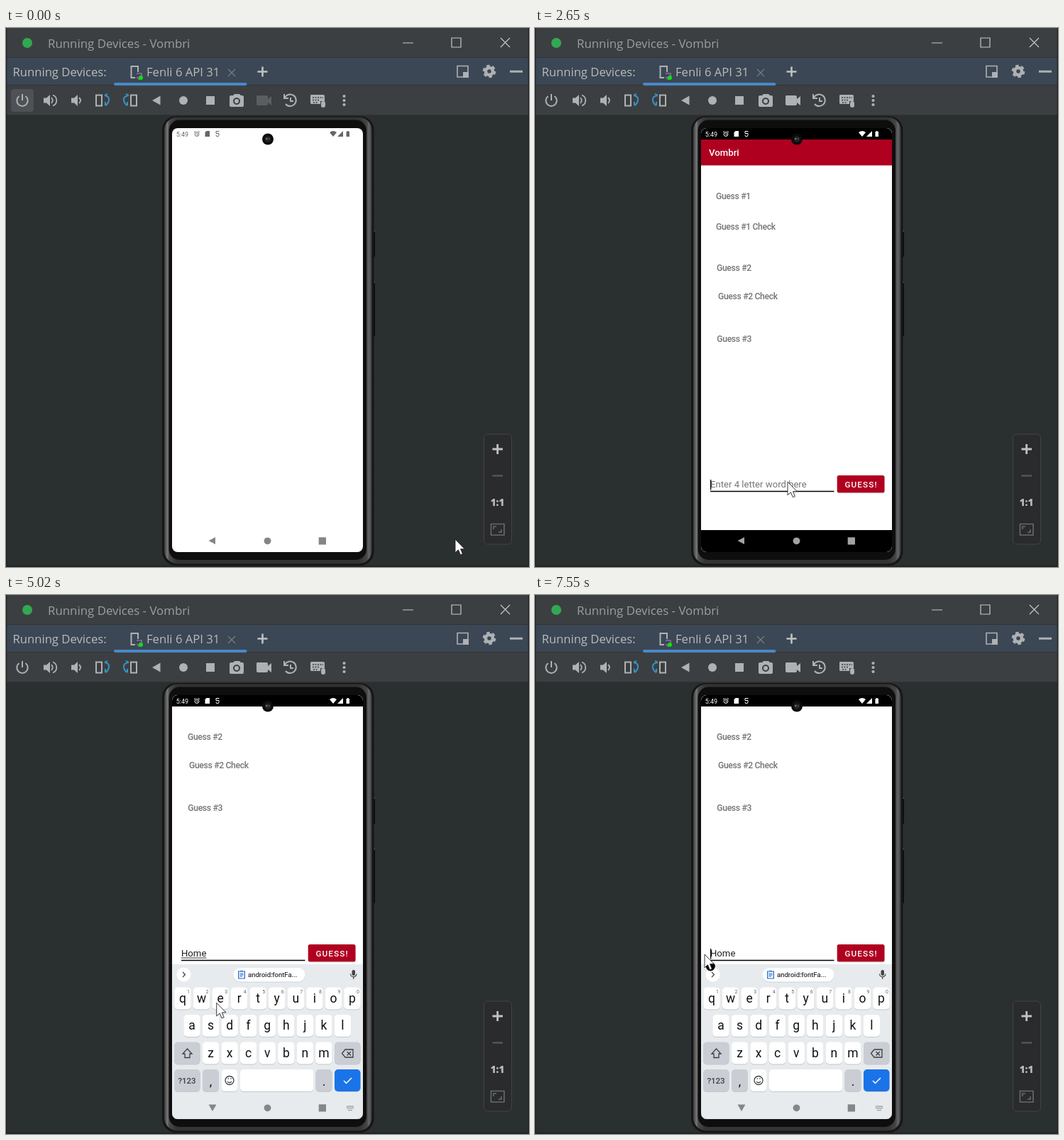
An HTML page that plays this animation: 737 by 759 pixels, repeating every 8000 ms.

```html
<!DOCTYPE html>
<html lang="en">
<head>
<meta charset="utf-8">
<title>Running Devices</title>
<style>
html, body { margin: 0; width: 100%; height: 100%; overflow: hidden; background: #2a2f30; }
svg { display: block; width: 100%; height: 100%; }
text { white-space: pre; font-family: Roboto, sans-serif; }
.ide { font-family: "Open Sans", sans-serif; font-size: 16.65px; fill: #bbb; }
.icon { fill: #afb1b3; }
.line { fill: none; stroke: #afb1b3; stroke-width: 2; }
.blue { stroke: #3592c4; }
.label { font-size: 12.2px; font-weight: 500; letter-spacing: -.35px; fill: #757575; }
.field { font-size: 13.15px; }
.button { font-size: 11.8px; font-weight: 500; letter-spacing: 1.05px; fill: #fff; }
.key { font-size: 17.5px; text-anchor: middle; fill: #111; }
.digit { font-size: 7px; text-anchor: middle; fill: #5f6368; }
</style>
</head>
<body>
<svg viewBox="0 0 737 759" preserveAspectRatio="none">
  <defs>
    <linearGradient id="metal" gradientUnits="userSpaceOnUse" x1="223" x2="515.500">
      <stop offset="0" stop-color="#3a3a3a"/><stop offset=".016" stop-color="#777"/>
      <stop offset=".024" stop-color="#4a4a4a"/><stop offset=".06" stop-color="#333"/>
      <stop offset=".94" stop-color="#333"/><stop offset=".976" stop-color="#464646"/>
      <stop offset=".986" stop-color="#666"/><stop offset="1" stop-color="#3a3a3a"/>
    </linearGradient>
    <clipPath id="screen"><rect x="234" y="141" width="269" height="597" rx="8"/></clipPath>
    <clipPath id="below-status"><rect x="234" y="157" width="269" height="581"/></clipPath>
  </defs>

  <!-- window chrome -->
  <rect width="737" height="759" fill="#2a2f30"/>
  <rect width="737" height="123" fill="#3c3f41"/>
  <rect y="42" width="737" height="38" fill="#3b4754"/>
  <path d="M0 41.5H737M0 80.5H737M0 122.5H737" stroke="#313335"/>
  <path d="M.5 0V759M736.5 0V759M0 757.8H737" stroke="#1f2122" stroke-width="1.4"/>
  <circle cx="30" cy="21" r="7" fill="#32a852"/>
  <text class="ide" x="59" y="27.5" style="font-size:16.85px;fill:#9c9fa0">Running Devices - Vombri</text>
  <path d="M559 21H574M628 14H641V27H628ZM697 14L710 27M710 14L697 27" fill="none" stroke="#c6c7c8" stroke-width="1.2"/>
  <text class="ide" x="9.5" y="68">Running Devices:</text>
  <text class="ide" x="198" y="68">Fenli 6 API 31</text>
  <rect x="152" y="77" width="187.500" height="4" rx="2" fill="#4a88c7"/>
  <path class="line" d="M182 70H176.500V54H186V62" stroke-width="2"/>
  <path d="M184 64H191V70H184M186 72H191" fill="none" stroke="#8e6aad" stroke-width="1.6"/>
  <circle cx="190" cy="70" r="3" fill="#0be30b"/>
  <path d="M313 58L323 68M323 58L313 68" stroke="#777d82" stroke-width="1.2"/>
  <path d="M354.500 61.500H368.500M361.500 54.500V68.500" stroke="#bfc1c3" stroke-width="2.600"/>
  <path class="line" d="M636 53.500H651V69H636Z" style="stroke-width:1.600"/>
  <path class="icon" d="M644 62H652V70H644ZM710 59.800H728V62.800H710Z"/>
  <circle class="line" cx="681" cy="61" r="5" style="stroke-width:4.500"/>
  <circle class="line" cx="681" cy="61" r="8" style="stroke-width:2.600" stroke-dasharray="4.600 3.778"/>

  <!-- device toolbar -->
  <rect id="power-focus" x="7" y="86" width="32" height="32" rx="4" fill="#4e5254"/>
  <path class="line" d="M23 93V102M18.500 96A7.700 7.700 0 1 0 27.500 96"/>
  <path class="icon" d="M53 98.500H57L62 94V110L57 105.500H53ZM92 98.500H96L101 94V110L96 105.500H92Z"/>
  <path class="line" d="M64 98Q67.500 102 64 106M66 94.500C73 97 73 107 66 109.500M103 98Q107 102 103 106" style="stroke-width:1.800"/>
  <path class="line" d="M127 94.500H135V109.500H127ZM176 94.500H184V109.500H176Z"/>
  <path class="line blue" d="M139 95Q146 96 145 102Q144 107 140 109M139 95L143 93M140 109L140 104M173 95Q165 96 166 102Q167 107 171 109M173 95L169 93M171 109L171 104"/>
  <path class="icon" d="M206 102L217.500 95.500V108.500ZM282 96H294V108H282Z"/>
  <circle class="icon" cx="250" cy="102" r="6"/>
  <path class="icon" fill-rule="evenodd" d="M317 95H320L322 93H329L331 95H333Q335 95 335 97V109Q335 111 333 111H317Q315 111 315 109V97Q315 95 317 95ZM325 98A5 5 0 1 0 325.010 98Z"/>
  <circle class="icon" cx="325" cy="103" r="3"/>
  <path id="video" d="M354 95H367Q369 95 369 97V100L374 96V109L369 105V107Q369 109 367 109H355Q353 109 353 107V97Q353 95 354 95Z"/>
  <path class="line" d="M393 98A8.300 8.300 0 1 1 394 107M392 93V99H398M401 98V103H405"/>
  <path class="icon" d="M430 94H447Q449 94 449 96V103H443V107H430Q429 107 429 105V96Q429 94 430 94Z"/>
  <path d="M432 98H447M432 101.500H442M433 105H440" stroke="#3c3f41" stroke-width="1.700" stroke-dasharray="2 1.500"/>
  <rect class="icon" x="444" y="103" width="6" height="9" rx="3"/>
  <g class="icon"><circle cx="476.500" cy="96" r="2.100"/><circle cx="476.500" cy="102" r="2.100"/><circle cx="476.500" cy="108" r="2.100"/></g>

  <!-- zoom panel -->
  <rect x="673.500" y="572" width="39" height="155" rx="5" fill="#292b2c" stroke="#424446"/>
  <path d="M685.500 593H700M692.700 586V600" stroke="#bfc1c3" stroke-width="2.800"/>
  <path d="M685.500 630.500H700" stroke="#595c5d" stroke-width="2.200"/>
  <text class="ide" x="692.500" y="673" text-anchor="middle" style="font-size:13.500px;font-weight:800">1:1</text>
  <path d="M683.500 698.500H702V714H683.500ZM687 706V702H691M698 706V710H694" fill="none" stroke="#686b6c" stroke-width="1.600"/>

  <!-- phone body -->
  <path d="M518.500 286V322M518.500 358V434" stroke="#0d0d0d" stroke-width="3"/>
  <path d="M518 286H520M518 358H520M220 208H222M220 680H222" stroke="#777"/>
  <rect x="220" y="124" width="298.500" height="633" rx="20" fill="#161616"/>
  <rect x="223" y="125.500" width="292.500" height="629" rx="18.500" fill="url(#metal)"/>
  <rect x="229.500" y="129.500" width="278.500" height="619.500" rx="15" fill="#0e0e0e"/>

  <g clip-path="url(#screen)">
    <rect x="234" y="141" width="269" height="597" fill="#fff"/>
    <g id="app">
      <rect x="234" y="141" width="269" height="597" fill="#fff"/>
      <g clip-path="url(#below-status)">
        <g id="content">
          <rect x="234" y="157" width="269" height="36.500" fill="#b00020"/>
          <text x="245" y="180.300" fill="#fff" font-size="13.200" font-weight="500">Vombri</text>
          <g class="label">
            <text x="255" y="241">Guess #1</text><text x="255" y="284">Guess #1 Check</text>
            <text x="256" y="342">Guess #2</text><text x="258" y="382">Guess #2 Check</text>
            <text x="256.300" y="442">Guess #3</text>
          </g>
          <path id="rule" d="M247 652.500H421.500"/>
          <text id="hint" class="field" x="247" y="647" fill="#757575">Enter 4 letter word here</text>
          <text id="word" class="field" x="247" y="647" fill="#202020"></text>
          <path id="compose" stroke="#202020" stroke-width=".9"/>
          <rect id="caret" y="636" width="1.300" height="14.500"/>
          <rect x="426" y="631" width="66.500" height="24.300" rx="3" fill="#000" opacity=".2"/>
          <rect x="425.700" y="630" width="66.800" height="24.300" rx="2.600" fill="#b00020"/>
          <rect id="ripple" x="425.700" y="630" width="66.800" height="24.300" rx="2.600" fill="#fff"/>
          <text class="button" x="436.500" y="646.600">GUESS!</text>
        </g>
      </g>
      <rect x="234" y="141" width="269" height="16" fill="#000"/>
      <rect x="234" y="707" width="269" height="31" fill="#000"/>
    </g>
    <g id="status">
      <text x="239.700" y="152.600" font-size="9">5:49</text>
      <circle cx="269" cy="149.500" r="2.900" fill="none" stroke="currentColor"/>
      <path d="M265 147L267 145M273 147L271 145M269 148V150H270.500" fill="none" stroke="currentColor" stroke-width=".9"/>
      <path d="M282.500 145H287V153H280.500V147Z"/>
      <path d="M300.500 145.500H296V148.500H300V150.500Q300 153 298 153Q296 153 296 150.500" fill="none" stroke="currentColor"/>
      <path d="M456 147Q461 143 466 147L461 153ZM467 153L475 145V153ZM479.500 146H480.700V145H482.700V146H484V153H479.500Z"/>
    </g>
    <g id="keyboard"></g>
    <g id="nav">
      <path id="back" d="M285.500 722L295 717V727Z"/>
      <circle cx="368.500" cy="722.300" r="4.900"/>
      <path d="M440.700 717.300H451V727.500H440.700Z"/>
    </g>
    <path id="handle" d="M247.300 516L252 518.500A6.500 6.500 0 1 1 242.600 518.500Z"/>
  </g>
  <circle cx="369" cy="156.500" r="8" fill="#0b0c0d"/>
  <circle cx="369" cy="156.500" r="4" fill="#22262a"/>
  <circle cx="367.300" cy="156" r="1.100" fill="#8a9299"/><circle cx="371" cy="156" r=".8" fill="#646b70"/>
  <path id="pointer" d="M0 0V18.800L4.400 14.800L7.400 21.800L10.400 20.500L7.600 13.700H13.300Z" fill="#fff" stroke="#222" stroke-width=".9"/>
</svg>

<script>
const LOOP = 8000, PAN = 138, CLICK = 7400;
const $ = id => document.getElementById(id);
const clamp = v => Math.max(0, Math.min(1, v));
const easeOut = v => 1 - (1 - clamp(v)) ** 3;

const bursts = [
  [1330, 1640, 5], [1780, 2580, 11], [2650, 2730, 2], [2920, 3260, 6],
  [4390, 5180, 11], [5250, 5410, 3], [5560, 5790, 4], [6040, 6740, 10], [6910, 7550, 9]
];
const ticks = bursts.flatMap(([a, b, n]) =>
  Array.from({ length: n }, (_, i) => a + (b - a) * i / (n - 1)));
const snap = t => ticks.reduce((last, tick) => tick <= t + 3 ? tick : last, 0);

const route = [
  [0, 633, 720], [1720, 633, 720], [2150, 500, 688], [2560, 356, 639],
  [4320, 356, 639], [4780, 277, 592], [5025, 297, 574], [5180, 457, 516],
  [5400, 448, 511], [6240, 448, 511], [6740, 322, 494], [6840, 322, 494],
  [7070, 290, 470], [7390, 239, 506], [LOOP, 239, 506]
];
function pointerAt(t) {
  const i = route.findIndex(p => p[0] > t);
  const [t0, x0, y0] = route[i - 1], [t1, x1, y1] = route[i];
  const k = (t - t0) / (t1 - t0);
  return [x0 + (x1 - x0) * k, y0 + (y1 - y0) * k];
}

const typed = [[3600, "H"], [3830, "Ho"], [4010, "Hom"], [4160, "Home"]];
const caretResets = [2650, ...typed.map(k => k[0]), CLICK];

function buildKeyboard() {
  const key = (x, y, w, fill = "#fff") =>
    `<rect x="${x}" y="${y + 1}" width="${w}" height="31" rx="5" fill="#c3c8cc"/>
     <rect x="${x}" y="${y}" width="${w}" height="31" rx="5" fill="${fill}"/>`;
  const grey = "#cacdd4", rows = [["QWERTYUIOP", 249, 552.5], ["ASDFGHJKL", 262, 591], ["ZXCVBNM", 288.6, 629.5]];
  let out = `<rect x="234" y="520" width="269" height="218" fill="#e7ebed"/>
    <circle cx="250.500" cy="534.500" r="10" fill="#fff"/>
    <path d="M249 531L252.500 534.500L249 538" fill="none" stroke="#444" stroke-width="1.300"/>
    <rect x="320.500" y="526" width="101" height="19.500" rx="9.700" fill="#d0d4d7"/>
    <rect x="320.500" y="525" width="101" height="19.500" rx="9.700" fill="#fff"/>
    <path d="M327.700 530H336.300V540H327.700ZM330 529.500H334M329.500 533H334.500M329.500 535H334.500M329.500 537H333" fill="none" stroke="#1a66c9" stroke-width="1.200"/>
    <text x="341" y="538" font-size="9.500" fill="#222" stroke="#222" stroke-width=".15">android:fontFa...</text>
    <rect x="487.500" y="528" width="4.500" height="8" rx="2.200" fill="#444"/>
    <path d="M485.500 533.500A4.200 4.200 0 0 0 494 533.500M489.750 538V541" fill="none" stroke="#444" stroke-width="1.200"/>`;
  rows.forEach(([letters, x0, y], row) => [...letters].forEach((c, i) => {
    const x = x0 + 26.55 * i;
    out += key(x - 11.7, y, 23.4) + `<text class="key letter" x="${x}" y="${y + 22}">${c}</text>`;
    if (!row) out += `<text class="digit" x="${x + 8}" y="560.500">${(i + 1) % 10}</text>`;
  }));
  out += key(237, 629.5, 36.5, grey) + key(463, 629.5, 36.5, grey) + key(237, 668, 36.5, grey) +
    key(277, 668, 23, grey) + key(303.5, 668, 23) + key(330, 668, 103.5) +
    key(436.5, 668, 23, grey) + key(463, 668, 36.5, "#1a73e8") +
    `<path id="shift" d="M255.500 639L262 646H259V651.500H252V646H249Z" stroke="#3c4043" stroke-width="1.300"/>
    <path d="M473.500 645.500L478 640H489V651H478ZM480.500 643L486 648.500M486 643L480.500 648.500" fill="none" stroke="#3c4043" stroke-width="1.300"/>
    <text class="key" x="255" y="688" style="font-size:11.500px;font-weight:500;fill:#3c4043">?123</text>
    <text class="key" x="288.500" y="691">,</text><text class="key" x="448" y="691">.</text>
    <circle cx="315" cy="683.500" r="6" fill="none" stroke="#3c4043" stroke-width="1.300"/>
    <path d="M312 685A3.500 3.500 0 0 0 318 685M312.500 681H313.800M316.300 681H317.600" fill="none" stroke="#3c4043" stroke-width="1.400"/>
    <path d="M476 684L479.500 687.500L487 680" fill="none" stroke="#fff" stroke-width="1.500"/>
    <path d="M480 720H490M480 722.500H490M482 725.500H488" stroke="#8a8e91" stroke-width="1.500" stroke-dasharray="1.500 .6"/>`;
  $("keyboard").innerHTML = out;
}
buildKeyboard();
const letters = [...document.querySelectorAll(".letter")];
const set = (id, attrs) => Object.entries(attrs).forEach(([k, v]) => $(id).setAttribute(k, v));
const show = (id, on) => $(id).style.visibility = on ? "visible" : "hidden";

function setCase(lower) {
  letters.forEach(n => {
    n.textContent = lower ? n.textContent.toLowerCase() : n.textContent.toUpperCase();
    n.setAttribute("dy", lower ? -1 : 0);
  });
  set("shift", { fill: lower ? "none" : "#3c4043" });
}

function draw(t) {
  const s = snap(t);
  const [px, py] = pointerAt(s);
  set("pointer", { transform: `translate(${px} ${py})` });

  show("power-focus", t < 2500);
  set("video", { fill: t < 410 ? "#5b5e60" : "#afb1b3" });

  const launched = t >= 1640, opening = t >= 1330;
  const fade = !opening ? 0 : launched ? 1 : t < 1400 ? .35 : t < 1460 ? .65 : t < 1560 ? .88 : .97;
  set("app", { opacity: fade });
  const ink = launched ? "#fff" : opening ? "#080808" : "#666";
  set("status", { fill: ink, color: ink });

  const pan = easeOut((s - 2850) / 360), rise = easeOut((s - 2850) / 400);
  const keyboardUp = s >= 2920;
  set("content", { transform: `translate(0 ${-PAN * pan})` });
  set("keyboard", { transform: `translate(0 ${218 * (1 - rise)})` });
  show("keyboard", keyboardUp);
  set("nav", { fill: keyboardUp ? "#83878a" : launched ? "#a2a2a2" : opening ? "#606263" : "#858585" });
  set("back", { d: keyboardUp ? "M285.500 717.500H296.500L291 727Z" : "M285.500 722L295 717V727Z" });

  const focused = t >= 2650, lower = t >= 3680;
  set("rule", { stroke: focused ? "#000" : "#808080", "stroke-width": focused ? 1.7 : 1 });
  const word = typed.reduce((w, [at, text]) => t >= at ? text : w, "");
  $("word").textContent = word;
  show("hint", !word);
  const width = word ? $("word").getComputedTextLength() : 0;
  set("compose", { d: `M247 649H${247 + width}` });
  show("compose", lower && t < CLICK);
  const reset = caretResets.reduce((r, at) => t >= at ? at : r, 0);
  set("caret", { x: 247 + (t < CLICK ? width : 0) });
  show("caret", focused && (t - reset) % 1000 < 500);
  show("handle", t >= CLICK);

  setCase(lower);
  set("ripple", { opacity: .19 * clamp((s - 5490) / 300) * (1 - clamp((s - 5960) / 300)) });
}

let start;
function frame(now) {
  start ??= now;
  draw((now - start) % LOOP);
  requestAnimationFrame(frame);
}
draw(0);
requestAnimationFrame(frame);
</script>
</body>
</html>
```
